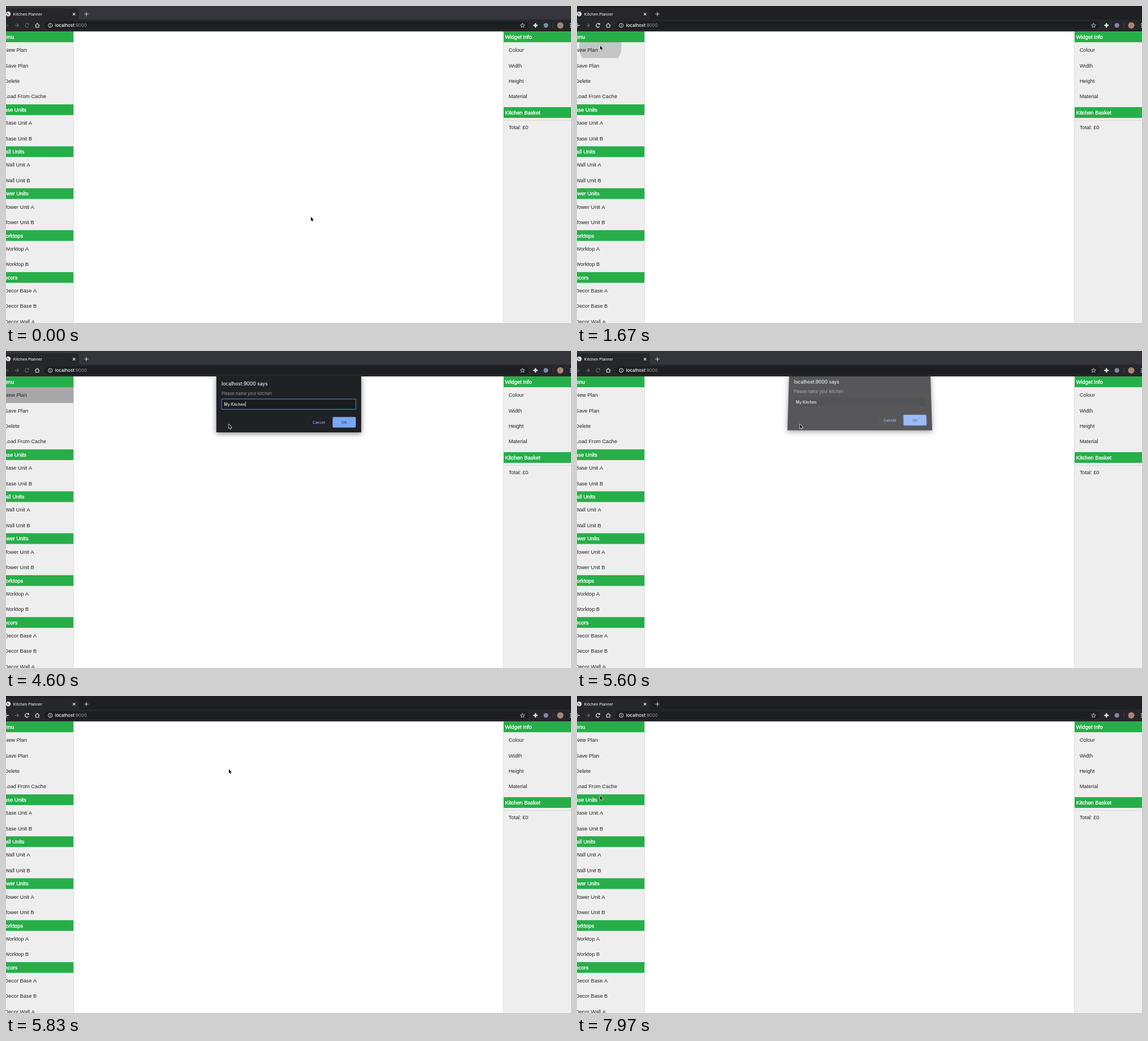
Write an HTML page with a canvas that moves like this. It is 999 by 561 pixels and loops after 8 s.

```html
<!DOCTYPE html>
<html lang="en">
<head>
<meta charset="utf-8">
<title>Kitchen Planner</title>
<style>
  html, body { margin: 0; width: 100%; height: 100%; overflow: hidden; background: #fff; }
  canvas { display: block; position: absolute; }
  #page, #pointer { left: 0; top: 0; width: 999px; height: 561px; }
  #sheet { position: absolute; left: 351px; top: 44px; width: 297px; height: 130px; overflow: hidden; }
  #dialog {
    left: 20.5px; top: 0; width: 256px; height: 100px;
    transform-origin: 50% 100%;
    box-shadow: 0 2px 9px rgba(0, 0, 0, .5);
  }
</style>
</head>
<body>
<canvas id="page"></canvas>
<div id="sheet"><canvas id="dialog"></canvas></div>
<canvas id="pointer"></canvas>
<script>
const LOOP = 8000, CLICK = 1540, OPEN = 1800, CLOSE = 5550;
const UI = 'Inter, sans-serif';
const BODY = '"Liberation Sans", Arial, sans-serif';
const ROW = 27.4, HEAD = 19.4;
const LIGHT = '#e4e6e9';

const page = layer('page', 999, 561);
const dialog = layer('dialog', 256, 100);
const pointer = layer('pointer', 999, 561);

const menu = {
  'Menu': ['New Plan', 'Save Plan', 'Delete', 'Load From Cache'],
  'Base Units': ['Base Unit A', 'Base Unit B'],
  'Wall Units': ['Wall Unit A', 'Wall Unit B'],
  'Tower Units': ['Tower Unit A', 'Tower Unit B'],
  'Worktops': ['Worktop A', 'Worktop B'],
  'Decors': ['Decor Base A', 'Decor Base B', 'Decor Wall A']
};

const home = { x: 539, y: 373 };
const moves = [
  { from: 330, to: 930, x: 60, y: 94 },
  { from: 1170, to: 1470, x: 41, y: 70 },
  { from: 2070, to: 2300, x: 394, y: 129.5 },
  { from: 6530, to: 7300, x: 50, y: 140 },
  { from: 7530, to: 7970, x: 41, y: 176.5 }
];

const bursts = [
  { keys: 'M', at: 2700, gap: 0 },
  { keys: 'y ', at: 3000, gap: 70 },
  { keys: 'Kitchen', at: 3700, gap: 150 }
];
const strokes = bursts.flatMap(b => [...b.keys].map((key, i) => ({ key, at: b.at + i * b.gap })));

function layer(id, w, h) {
  const el = document.getElementById(id);
  const scale = window.devicePixelRatio || 1;
  el.width = Math.round(w * scale);
  el.height = Math.round(h * scale);
  const ctx = el.getContext('2d');
  ctx.scale(scale, scale);
  return ctx;
}

const ramp = (t, a, b) => Math.max(0, Math.min(1, (t - a) / (b - a)));
const mix = (a, b, k) => a + (b - a) * k;
const smooth = k => k * k * (3 - 2 * k);
const blend = (a, b, k) => `rgb(${a.map((v, i) => Math.round(mix(v, b[i], k)))})`;

function rect(c, x, y, w, h, fill) {
  c.fillStyle = fill;
  c.fillRect(x, y, w, h);
}

function box(c, x, y, w, h, r, fill, line, width = 1) {
  c.beginPath();
  c.roundRect(x, y, w, h, r);
  if (fill) { c.fillStyle = fill; c.fill(); }
  if (line) { c.strokeStyle = line; c.lineWidth = width; c.stroke(); }
}

function text(c, str, x, y, font, fill, align = 'left') {
  c.font = font;
  c.fillStyle = fill;
  c.textAlign = align;
  c.fillText(str, x, y);
}

function polyline(c, color, width, ...points) {
  c.strokeStyle = color;
  c.lineWidth = width;
  c.beginPath();
  points.forEach(p => c.lineTo(...p));
  c.stroke();
}

function arc(c, x, y, r, from = 0, to = 2 * Math.PI) {
  c.beginPath();
  c.arc(x, y, r, from, to);
}

function disc(c, x, y, r, fill) {
  arc(c, x, y, r);
  c.fillStyle = fill;
  c.fill();
}

function ring(c, x, y, r, color, width, from, to) {
  arc(c, x, y, r, from, to);
  c.strokeStyle = color;
  c.lineWidth = width;
  c.stroke();
}

function cross(c, x, y, r, color, width, angle = 0) {
  c.save();
  c.translate(x, y);
  c.rotate(angle);
  polyline(c, color, width, [-r, 0], [r, 0]);
  polyline(c, color, width, [0, -r], [0, r]);
  c.restore();
}

function arrow(c, x, y, dir, color) {
  polyline(c, color, 1.2, [x - 3.2 * dir, y], [x + 3.2 * dir, y]);
  polyline(c, color, 1.2, [x + .4 * dir, y - 3.1], [x + 3.5 * dir, y], [x + .4 * dir, y + 3.1]);
}

function star(c, x, y, color) {
  const points = Array.from({ length: 11 }, (_, i) => {
    const a = (i / 5 - .5) * Math.PI, r = i % 2 ? 1.9 : 4.2;
    return [x + r * Math.cos(a), y + r * Math.sin(a)];
  });
  polyline(c, color, .9, ...points);
}

function drawTabs(c, active) {
  rect(c, 0, 0, 999, 45, blend([53, 54, 59], [31, 32, 35], active));
  box(c, -10, 4, 139, 26, 5, '#26272b');
  rect(c, 0, 24, 999, 21, '#26272b');
  disc(c, 4, 14, 4.2, '#e8eaed');
  polyline(c, '#3a3b3f', 1, [1, 12.5], [4, 14], [3.5, 17]);
  text(c, 'Kitchen Planner', 12.8, 16.7, '500 6.75px ' + UI, LIGHT);
  cross(c, 120.3, 14.3, 3.1, LIGHT, 1.1, Math.PI / 4);
  cross(c, 142.1, 14.3, 3.7, '#c4c6ca', 1.1);
}

function drawToolbar(c, active) {
  const y = 34.3;
  const live = blend([95, 95, 95], [232, 232, 232], active);
  arrow(c, 1.7, y, -1, live);
  arrow(c, 18.8, y, 1, '#6b6d71');
  ring(c, 37.1, y, 3.2, live, 1.2, .5, 5.4);
  rect(c, 38.4, y - 3.7, 2.6, 2.6, live);
  polyline(c, LIGHT, 1.1, [51.3, y + .3], [55.3, y - 3.5], [59.3, y + .3]);
  polyline(c, LIGHT, 1.1, [52.7, y], [52.7, y + 3.4], [57.9, y + 3.4], [57.9, y]);

  box(c, 68, 27, 856, 14.6, 7.3, '#1d1e21');
  ring(c, 78.2, y, 3.6, LIGHT, 1);
  rect(c, 77.7, y - .5, 1, 2.5, LIGHT);
  rect(c, 77.7, y - 2.1, 1, 1, LIGHT);
  const font = '7.85px ' + UI;
  text(c, 'localhost', 86.8, 37.2, '500 ' + font, '#f4f5f6');
  text(c, ':9000', 86.8 + c.measureText('localhost').width, 37.2, font, '#9a9ca0');

  star(c, 913.3, y + .3, '#c9cbcf');
  cross(c, 936.2, y, 3.8, LIGHT, 2.6);
  disc(c, 954.6, y, 4.1, '#8087a5');
  rect(c, 966.8, 29.5, .8, 9.5, '#4b4d52');
  disc(c, 980, y, 5.6, '#a98376');
  for (const dy of [-3, 0, 3]) disc(c, 998, y + dy, .9, LIGHT);
}

function header(c, str, x, w, y, tx) {
  rect(c, x, y, w, 19, '#27ae49');
  text(c, str, tx, y + 12.9, '9.35px ' + BODY, '#fff');
  // thin outline gives a medium weight
  c.strokeStyle = '#fff';
  c.lineWidth = .3;
  c.strokeText(str, tx, y + 12.9);
}

// Draws a header with its rows and returns where the next one starts.
function section(c, name, rows, x, w, y, headX, rowX) {
  header(c, name, x, w, y, headX);
  rows.forEach((row, i) => text(c, row, rowX, y + 36.1 + i * ROW, '9.2px ' + BODY, '#222'));
  return y + HEAD + rows.length * ROW;
}

function drawRipple(c, t) {
  if (t < CLICK || t >= CLOSE) return;
  const spread = ramp(t, OPEN, 1950);
  const r = mix(8, 37.4, ramp(t, CLICK, 1670)) + 58 * spread;
  c.save();
  c.beginPath();
  c.rect(0, 64, 119.3, 28);
  c.clip();
  disc(c, 41.2, 72.5, r, `rgba(0,0,0,${mix(.172, .294, spread)})`);
  c.restore();
}

function drawPanels(c, t) {
  for (const [x, edge] of [[0, 119.2], [880, 879.2]]) {
    rect(c, x, 45, 119.2, 516, '#eee');
    rect(c, edge, 45, .9, 516, '#d7d7d7');
  }
  drawRipple(c, t);

  let y = 45.1;
  for (const name in menu) y = section(c, name, menu[name], 0, 119.2, y, -9.2, -2.5);

  section(c, 'Widget Info', ['Colour', 'Width', 'Height', 'Material'], 880, 119, 45.1, 882.4, 888.7);
  header(c, 'Kitchen Basket', 880, 119, 179, 882.4);
  rect(c, 880, 202, 119, .8, '#d4d4d4');
  text(c, 'Total: £0', 888.7, 217.6, '9.2px ' + BODY, '#222');
}

function drawPage(t) {
  const active = ramp(t, 60, 150) - ramp(t, OPEN + 20, 1920) + ramp(t, 5720, 5820);
  rect(page, 0, 0, 999, 561, '#fff');
  drawTabs(page, active);
  drawToolbar(page, active);
  drawPanels(page, t);
}

function drawField(c, t, focused) {
  box(c, 9.2, 41, 237.4, 18.2, 1.5, '#1a1b1e', focused ? '#3d719f' : '#2b2c30', focused ? 1.4 : .6);
  const done = strokes.filter(s => s.at <= t);
  const typed = done.map(s => s.key).join('');
  text(c, typed, 13.6, 52.6, '500 6.87px ' + UI, '#f1f3f4');
  const since = t - (done.length ? done[done.length - 1].at : 2060);
  if (focused && since % 940 < 470)
    rect(c, 13.8 + c.measureText(typed).width, 45.6, .8, 8.6, '#f1f3f4');
}

function drawDialog(t) {
  const c = dialog;
  const open = Math.min(ramp(t, OPEN, 1960), 1 - ramp(t, CLOSE, 5760));
  const away = 1 - open;
  c.canvas.style.opacity = open;
  c.canvas.style.transform = away
    ? `translateY(${-14.6 * away}px) scaleY(${1 + .08 * away}) perspective(210px) rotateX(${12.5 * away}deg)`
    : 'none';
  if (!open) return;

  rect(c, 0, 0, 256, 100, '#202124');
  text(c, 'localhost:9000 says', 9, 17.2, '500 8.45px ' + UI, '#e8eaed');
  text(c, 'Please name your kitchen', 9, 34, '7.33px ' + UI, '#95989d');
  drawField(c, t, t < CLOSE);

  const label = '500 6.7px ' + UI;
  box(c, 161.5, 73, 38.5, 18, 2, null, '#292b2f', .7);
  text(c, 'Cancel', 181, 84.6, label, '#84aef3', 'center');
  box(c, 205.5, 72.7, 41, 18.8, 2, '#7ba5f6');
  text(c, 'OK', 226, 84.6, label, '#33496f', 'center');
}

function pointerAt(t) {
  let { x, y } = home;
  for (const m of moves) {
    const k = smooth(ramp(t, m.from, m.to));
    x = mix(x, m.x, k);
    y = mix(y, m.y, k);
  }
  return [x, y];
}

function drawPointer(t) {
  const c = pointer;
  c.clearRect(0, 0, 999, 561);
  c.save();
  c.translate(...pointerAt(t));
  const shape = new Path2D('M0 0V7.4L1.7 5.8L2.9 8.5L4 8L2.9 5.4H5.1Z');
  c.lineJoin = 'round';
  c.strokeStyle = '#fff';
  c.lineWidth = 1.3;
  c.stroke(shape);
  c.fillStyle = '#0a0a0a';
  c.fill(shape);
  c.restore();
}

const start = performance.now();
function frame() {
  const t = (performance.now() - start) % LOOP;
  drawPage(t);
  drawDialog(t);
  drawPointer(t);
  requestAnimationFrame(frame);
}
frame();
</script>
</body>
</html>
```
